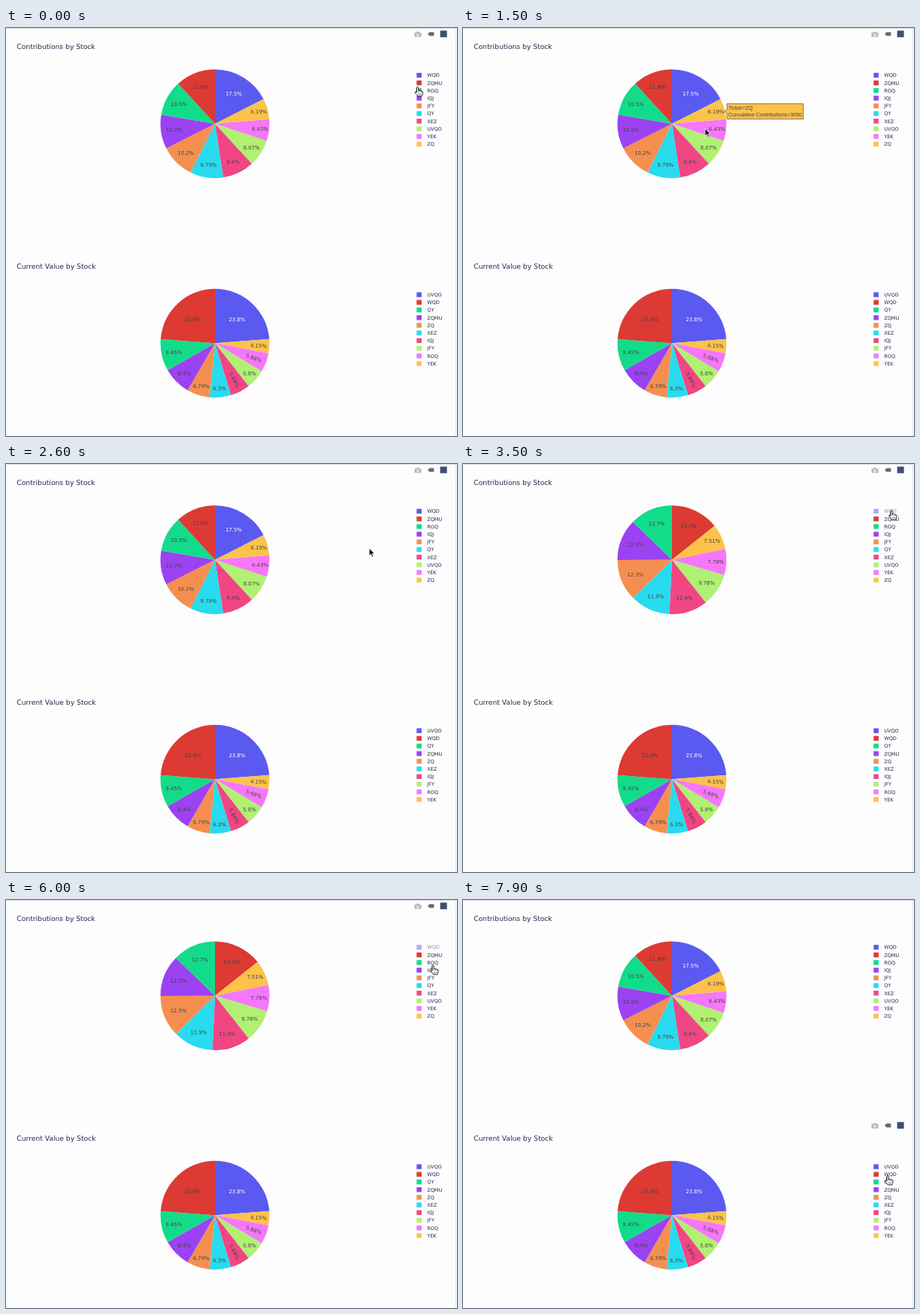
An HTML page that plays this animation: 600x544 px, repeating every 8 s.

```html
<!DOCTYPE html>
<html lang="en">
<head>
<meta charset="utf-8">
<title>Stock pies</title>
<style>
html, body { margin: 0; width: 100%; height: 100%; overflow: hidden; background: #fdfdfe; }
svg { display: block; width: 600px; height: 544px; font-family: "DejaVu Sans", Verdana, sans-serif; }
.title { font-size: 9.2px; fill: #1f2a4c; }
.legend { font-size: 6.5px; fill: #1f2a4c; }
.label { font-size: 6.9px; text-anchor: middle; }
.tip { font: 7px "Liberation Sans", Arial, sans-serif; }
</style>
</head>
<body>
<svg id="stage" viewBox="0 0 600 544">
  <defs>
    <g id="modebar">
      <path fill="#b4b4b4" fill-rule="evenodd" d="M543.5 6.2h2.3l.8-1.5h2.8l.8 1.5h2.3v5.6h-9zM548 6.9a2 2 0 1 0 .01 0z"/>
      <circle cx="548" cy="8.9" r="1.1" fill="#b4b4b4"/>
      <path fill="#6a6a6e" d="M561 8l2.5-2.6h5.8v5.2h-5.8z"/>
      <rect x="577.6" y="3.5" width="9" height="8.8" fill="#3f4f75"/>
    </g>
  </defs>
  <rect width="600" height="544" fill="#fdfdfe"/>
  <path d="M0 .5H600M598.7 0V544" stroke="#dedee2" fill="none"/>
  <text class="title" x="14.3" y="28.3">Contributions by Stock</text>
  <text class="title" x="14.3" y="320.9">Current Value by Stock</text>
  <use id="barTop" href="#modebar"/>
  <use id="barLow" href="#modebar" y="292.6"/>
  <g id="pieTop"></g>
  <g id="pieLow" transform="translate(0 292.6)"></g>
  <g id="tooltip"></g>
  <path id="arrow" fill="#111" stroke="#fff" stroke-width=".7" d="M0 0V9.8L2.2 7.8 4 11.5 5.6 10.8 3.9 7.2H7.1Z"/>
  <g id="hand" stroke="#111" stroke-width=".9" stroke-linejoin="round">
    <path fill="#fff" d="M-1.2 .8Q-1.2-.5 0-.5T1.2 .8V4.5C1.6 3.6 3.4 3.8 3.4 4.8 4 4 5.4 4.3 5.4 5.4 6.2 4.9 7 5.4 7 6.4V8C7 9.5 6.2 10 6 11.8H.2C-.3 10.4-2.6 8.5-3.3 7-3.8 5.8-2.2 5.4-1.2 6.8Z"/>
    <path fill="none" d="M-1.2 1V7M1.2 4V6.5M3.4 4.8V6.7M5.4 5.4V7M1.3 8.3V10.2M3 8.3V10.2M4.7 8.3V10.2" stroke-width=".6"/>
  </g>
</svg>
<script>
const $ = id => document.getElementById(id);
const CX = 278, CY = 127.7, R = 72.5, LOOP = 8;
const ROW_Y = 63, ROW_STEP = 10.2, LOWER = 292.6;
const COLORS = ['#5a5af0', '#dc3a33', '#12dc8a', '#9b42f2', '#f58f50',
                '#28dbee', '#f04684', '#b0f073', '#f577fa', '#fcc249'];
const FIRST = 0, LAST = 9;

const top10 = {
  names: ['WQD', 'ZQMU', 'ROQ', 'IQJ', 'JFY', 'QY', 'XEZ', 'UVQO', 'YEK', 'ZQ'],
  values: [17.5, 11.8, 10.5, 10.17, 10.17, 9.79, 9.4, 8.07, 6.427, 6.195]
};
const low10 = {
  names: [7, 0, 5, 1, 9, 6, 3, 4, 2, 8].map(i => top10.names[i]),
  values: [23.8, 23.8, 9.45, 8.4, 6.79, 6.3, 5.84, 5.8, 5.68, 4.15]
};

// The largest slice runs clockwise from the top, the others counterclockwise.
function layout(values, hidden) {
  const shown = values.map((_, i) => i).filter(i => !hidden.includes(i));
  const total = shown.reduce((sum, i) => sum + values[i], 0);
  let start = 0;
  return [shown[0], ...shown.slice(1).reverse()].map(i => {
    const frac = values[i] / total, end = start + frac * 2 * Math.PI;
    const s = Math.sin(Math.PI * frac);
    const slice = { i, frac, start, end, mid: (start + end) / 2, inscribed: s / (1 + s) };
    start = end;
    return slice;
  });
}

const polar = (angle, r) => [CX + r * Math.sin(angle), CY - r * Math.cos(angle)];
const contrast = i => i === FIRST ? '#fff' : '#444';

function sliceMarkup(s) {
  const text = Number((s.frac * 100).toPrecision(3)) + '%';
  const fits = s.inscribed * R * 2 >= (text.length > 4 ? 23 : 18);
  let reach = 1 - s.inscribed, turn = 0;
  if (!fits) {
    const aspect = 2.44, q = aspect + 1 / (2 * Math.tan(Math.PI * s.frac));
    const half = 1 / (Math.sqrt(q * q + .5) + q);
    reach = Math.cos(half) - half * aspect;
    turn = s.mid * 180 / Math.PI + (s.mid < Math.PI ? -90 : 90);
  }
  const at = polar(s.mid, reach * R);
  return `<path fill="${COLORS[s.i]}" d="M${CX} ${CY}L${polar(s.start, R)}A${R} ${R} 0 0 1 ${polar(s.end, R)}Z"/>
    <text class="label" fill="${contrast(s.i)}" transform="translate(${at}) rotate(${turn})" y="2.5">${text}</text>`;
}

function legendMarkup(name, i, hidden) {
  const y = ROW_Y + i * ROW_STEP;
  return `<g opacity="${hidden.includes(i) ? .5 : 1}">
    <rect x="546.3" y="${y - 3.2}" width="6.6" height="6.4" fill="${COLORS[i]}"/>
    <text class="legend" x="560.3" y="${y + 2.4}">${name}</text></g>`;
}

function drawPie(group, data, hidden) {
  group.innerHTML = layout(data.values, hidden).map(sliceMarkup).join('') +
    data.names.map((name, i) => legendMarkup(name, i, hidden)).join('');
}

// Pointer stops: seconds, x, y
const PATH = [
  [.05, 547.5, 79], [.85, 314, 95.5], [1.05, 314, 95.5], [1.3, 322, 114],
  [1.5, 322, 134], [1.65, 318, 152], [1.85, 308, 178], [2, 319, 203],
  [2.15, 322, 205], [2.9, 570, 62.5], [3.7, 570, 62.5], [4.4, 562.5, 158],
  [5.6, 562.5, 158], [6.2, 570, 63], [6.5, 570, 63], [6.8, 462, 65],
  [7.15, 462, 65], [7.85, 565, 368]
];

function pointer(t) {
  const n = PATH.findIndex(p => p[0] > t);
  if (n <= 0) return PATH[n ? PATH.length - 1 : 0].slice(1);
  const [a, b] = [PATH[n - 1], PATH[n]];
  const u = (t - a[0]) / (b[0] - a[0]), e = u * u * (3 - 2 * u);
  return [1, 2].map(k => a[k] + (b[k] - a[k]) * e);
}

function overLegend([x, y]) {
  const inRows = offset => y > offset + 57.5 && y < offset + 160;
  return x > 542 && x < 590 && (inRows(0) || inRows(LOWER));
}

function hiddenAt(t) {
  const hidden = [];
  if (t >= 3.2 && t < 6.5) hidden.push(FIRST);
  if (t >= 4.7 && t < 5.6) hidden.push(LAST);
  return hidden;
}

function hovered(t, hidden) {
  const [x, y] = pointer(t - .12), dx = x - CX, dy = y - CY;
  if (Math.hypot(dx, dy) > R) return null;
  const angle = (Math.atan2(dx, -dy) + 2 * Math.PI) % (2 * Math.PI);
  return layout(top10.values, hidden).find(s => angle >= s.start && angle < s.end);
}

function tooltipMarkup(s) {
  if (!s) return '';
  const [mx, y] = polar(s.mid, (1 - s.inscribed) * R), x = mx + s.inscribed * R;
  const amount = s.i === FIRST ? '8,728.83' : Math.round(top10.values[s.i] * 49.879) * 10;
  const right = x + (s.i === FIRST ? 115.2 : 104.5), ink = contrast(s.i);
  return `<path fill="${COLORS[s.i]}" stroke="${ink}" stroke-width=".7"
      d="M${x} ${y}l3-3V${y - 10.2}H${right}V${y + 10.2}H${x + 3}V${y + 3}Z"/>
    <g class="tip" fill="${ink}"><text x="${x + 4.7}" y="${y - 1.6}">Ticker=${top10.names[s.i]}</text>
    <text x="${x + 4.7}" y="${y + 7.2}">Cumulative Contributions=${amount}</text></g>`;
}

let pieState, tipState;

function render(t) {
  const hidden = hiddenAt(t), state = hidden.join();
  if (state !== pieState) drawPie($('pieTop'), top10, hidden);
  pieState = state;

  const slice = hovered(t, hidden), tip = slice ? slice.i : -1;
  if (tip !== tipState) $('tooltip').innerHTML = tooltipMarkup(slice);
  tipState = tip;

  const at = pointer(t), onLegend = overLegend(at);
  for (const [id, visible] of [['hand', onLegend], ['arrow', !onLegend]]) {
    $(id).setAttribute('transform', `translate(${at})`);
    $(id).setAttribute('visibility', visible ? 'visible' : 'hidden');
  }

  const swap = Math.min(1, Math.max(0, (t - 7.55) / .25));
  $('barTop').setAttribute('opacity', 1 - swap);
  $('barLow').setAttribute('opacity', swap);
}

drawPie($('pieLow'), low10, []);
const began = performance.now();
function tick() {
  render((performance.now() - began) / 1000 % LOOP);
  requestAnimationFrame(tick);
}
tick();
</script>
</body>
</html>
```
